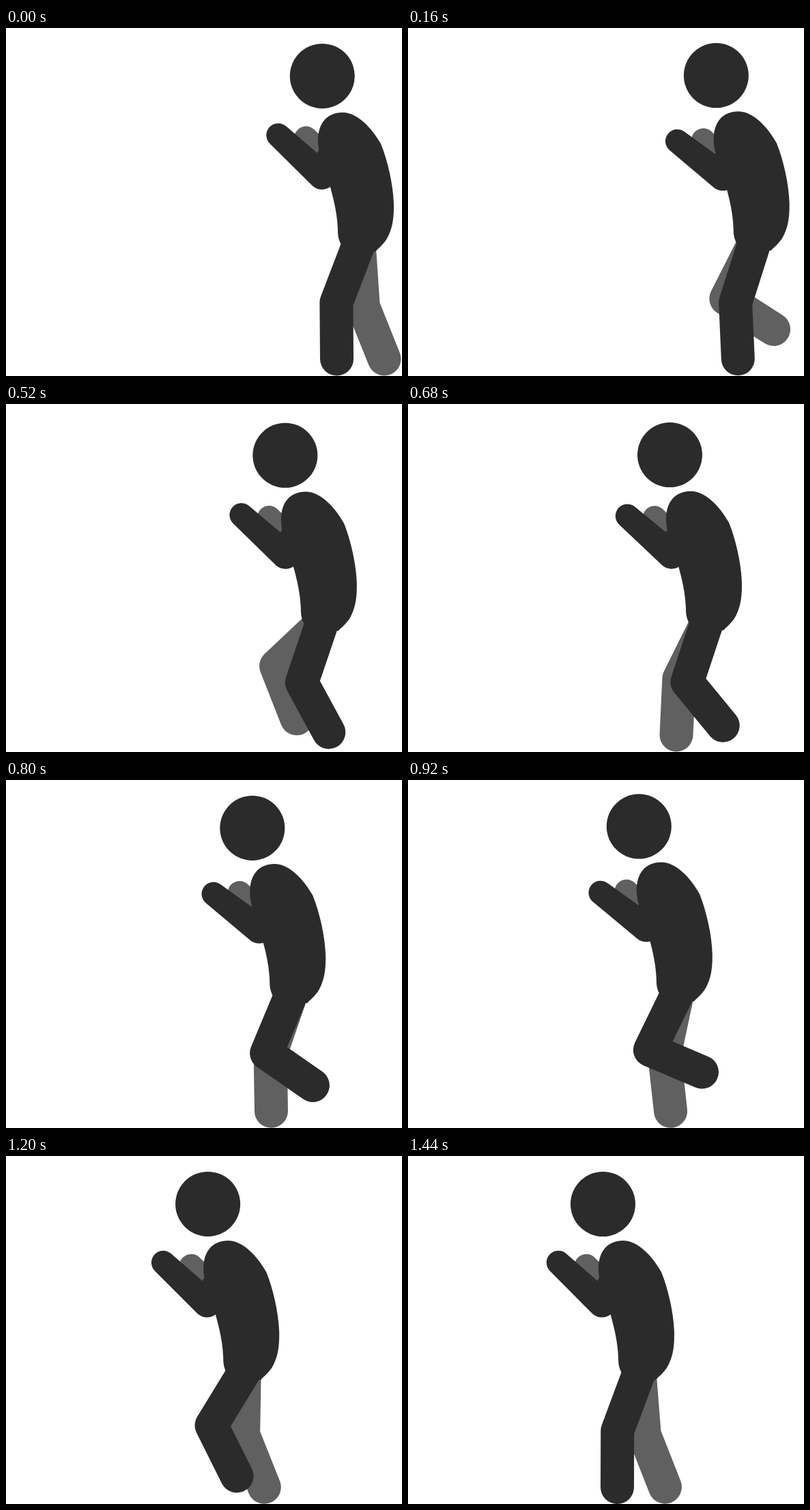
Write an HTML page that moves like this. It is 580 px wide and 510 px high and loops after 1.68 s.

```html
<!DOCTYPE html>
<html lang="en">
<head>
<meta charset="utf-8">
<title>Sneaking figure</title>
<style>
  html, body { margin: 0; width: 100%; height: 100%; overflow: hidden; background: #fff; }
  svg { display: block; width: 580px; height: 510px; }
  .far { fill: #606060; }
  .near { fill: #2b2b2b; }
</style>
</head>
<body>
<svg viewBox="0 0 580 510">
  <path id="far" class="far"/>
  <path id="torso" class="near" d="M457 165C457 140 470 124 493 124C515 124 536 147 549 170
    C560 197 568 235 568 262C568 283 565 295 559 307C554 317 543 325 541 328
    L495 324C486 312 486 303 486 295C485 270 479 248 474 230L462 192C459 183 457 175 457 165Z"/>
  <path id="near" class="near"/>
  <circle id="head" class="near" r="47.5"/>
</svg>
<script>
const LOOP = 1680, STEP = 40, END = 1440;
const THIGH = 92.5, SHIN = 82.8;
const LEG = 24.5, HAND = 17.4, ELBOW = 20.5;

// Smooth curve through [time, ...values] that never overshoots its points.
function track(...keys) {
  const last = keys.length - 1;
  const rate = (i, c) => (keys[i + 1][c] - keys[i][c]) / (keys[i + 1][0] - keys[i][0]);
  const slope = (i, c) => {
    if (i === 0 || i === last) return 0;
    const a = rate(i - 1, c), b = rate(i, c);
    return a * b > 0 ? 2 * a * b / (a + b) : 0;
  };
  return time => {
    const t = Math.min(time, keys[last][0]);
    let i = 0;
    while (i < last - 1 && t >= keys[i + 1][0]) i++;
    const a = keys[i], b = keys[i + 1], h = b[0] - a[0], u = (t - a[0]) / h, v = 1 - u;
    return a.slice(1).map((from, n) => {
      const c = n + 1;
      return from * v * v * (1 + 2 * u) + b[c] * u * u * (3 - 2 * u) +
        h * u * v * (slope(i, c) * v - slope(i + 1, c) * u);
    });
  };
}

const advance = track([0, 0], [360, -33], [680, -79], [1080, -149], [1320, -178]);
const nearFoot = track([0, 484.5, 485], [360, 479.5, 485], [680, 461.5, 471.5],
  [920, 430.5, 428], [1080, 366, 455], [END, 306.5, 485.5]);
const farFoot = track([0, 554, 485], [160, 535.5, 441.5], [360, 477.5, 437],
  [680, 393, 485.3], [END, 376.5, 485.3]);

// Flat-topped pulse around a moment.
const pulse = (t, centre) => Math.exp(-(((t - centre) / 215) ** 4));

// Rounded limb from a to b with its own radius at each end.
function capsule(a, b, r, s) {
  const d = Math.hypot(b[0] - a[0], b[1] - a[1]);
  const nx = (b[1] - a[1]) / d, ny = (a[0] - b[0]) / d;
  const at = (p, k) => `${(p[0] + nx * k).toFixed(2)} ${(p[1] + ny * k).toFixed(2)}`;
  return `M${at(a, r)}L${at(b, s)}A${s} ${s} 0 0 1 ${at(b, -s)}L${at(a, -r)}A${r} ${r} 0 0 1 ${at(a, r)}Z`;
}

// The knee follows from hip, foot and the two segment lengths.
function leg(hip, foot) {
  const dx = foot[0] - hip[0], dy = foot[1] - hip[1], d = Math.hypot(dx, dy);
  const along = (THIGH ** 2 - SHIN ** 2 + d * d) / (2 * d);
  const out = Math.sqrt(Math.max(0, THIGH ** 2 - along ** 2));
  const knee = [hip[0] + (dx * along - dy * out) / d, hip[1] + (dy * along + dx * out) / d];
  return capsule(hip, knee, LEG, LEG) + capsule(knee, foot, LEG, LEG);
}

const el = id => document.getElementById(id);
const far = el("far"), near = el("near"), torso = el("torso"), face = el("head");

function draw(t) {
  const first = pulse(t, 270), second = pulse(t, 900), sway = first + second;
  const [x] = advance(t);
  const y = 5 * pulse(t, 600) - 2 * first - 3.5 * second;
  const place = (px, py, sx = 0, sy = 0) => [px + x + sx * sway, py + y + sy * sway];

  const hip = place(517, 316), shoulder = place(490, 160);
  const elbow = place(462, 216, 9, 4.2), hand = place(398, 156, 6, 12.5);
  const farHand = place(439, 161, 3, 5.5), farElbow = place(485, 205, 3, 5.5);
  const [cx, cy] = place(463.5, 70.5, -3, 1);

  far.setAttribute("d", leg(hip, farFoot(t)) + capsule(farHand, farElbow, HAND, HAND));
  near.setAttribute("d", leg(hip, nearFoot(t)) + capsule(hand, elbow, HAND, ELBOW) +
    capsule(elbow, shoulder, ELBOW, ELBOW));
  torso.setAttribute("transform", `translate(${x} ${y})`);
  face.setAttribute("cx", cx);
  face.setAttribute("cy", cy);
}

const start = performance.now();
function tick() {
  const t = (performance.now() - start) % LOOP;
  draw(Math.min(Math.floor(t / STEP) * STEP, END));
  requestAnimationFrame(tick);
}
tick();
</script>
</body>
</html>
```
